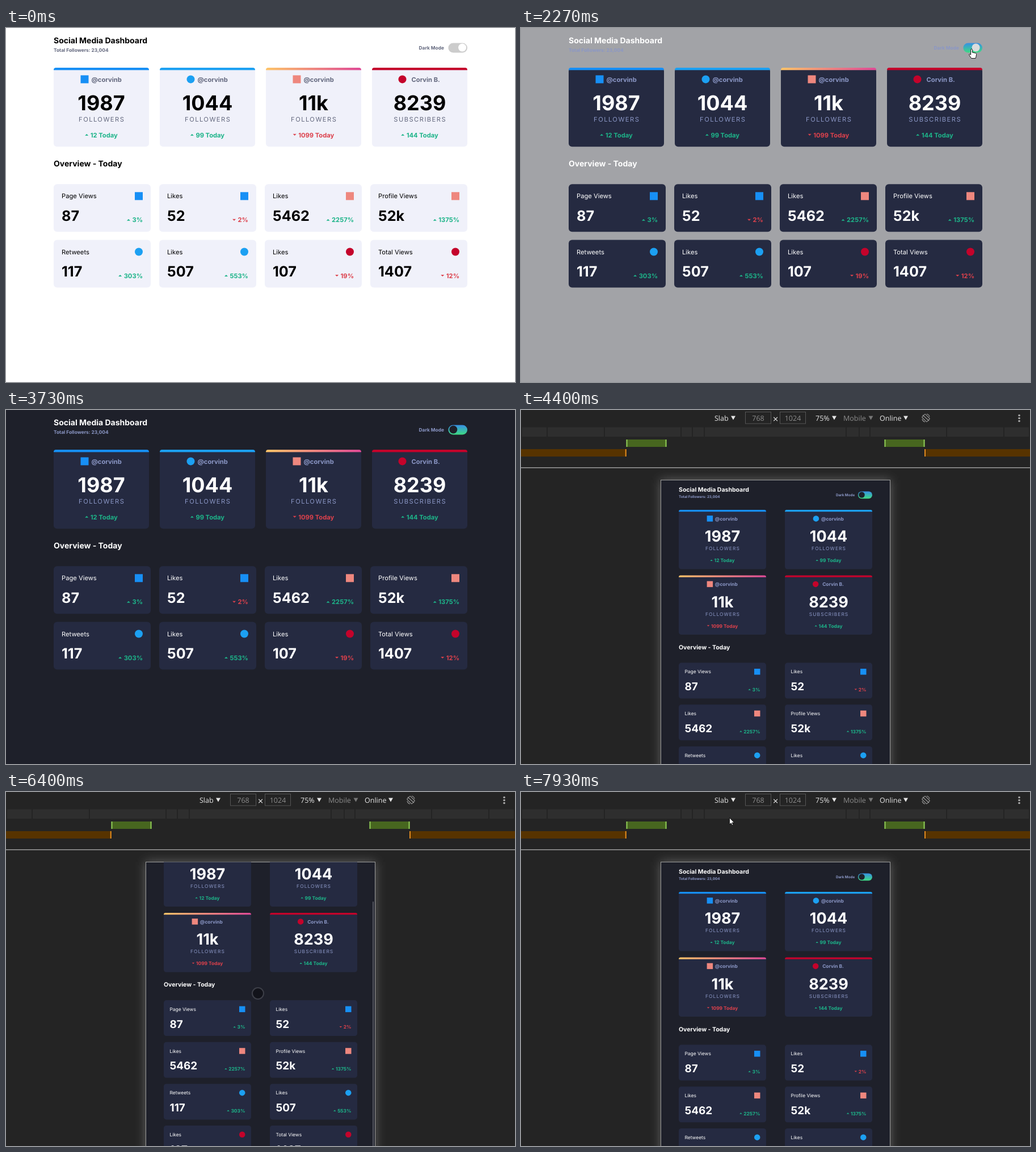
These frames come from a looping animation (897x624 px, 8000 ms). An HTML page:

```html
<!DOCTYPE html>
<html lang="en">
<head>
<meta charset="utf-8">
<title>Social Media Dashboard</title>
<style>
  html, body { margin: 0; width: 100%; height: 100%; overflow: hidden; background: #fff; }
  svg { display: block; font: 400 11.2px Inter, sans-serif; font-optical-sizing: none; text-rendering: geometricPrecision; }
  .light { --ink: #000; --mute: #63687e; --card: #f0f1fa; --pill: #ccc; }
  .dark { --ink: #fff; --mute: #8b97c6; --card: #252a41; --pill: url(#pill); }
  .ink { fill: var(--ink); }
  .mute { fill: var(--mute); }
  .card { fill: var(--card); }
  .pill { fill: var(--pill); }
  .bold { font-weight: 700; }
  .title { font-size: 14px; font-weight: 700; }
  .small { font-size: 8.4px; font-weight: 700; }
  .huge { font-size: 36px; font-weight: 700; text-anchor: middle; }
  .big { font-size: 25.2px; font-weight: 700; }
  .caps { letter-spacing: 1.45px; text-anchor: middle; }
  .end { text-anchor: end; }
  .up { fill: #1db489; font-weight: 700; }
  .down { fill: #dc414c; font-weight: 700; }
  .tools { font: 12.5px "Open Sans", sans-serif; fill: #e6e6e6; }
  .tools .dim { fill: #8c8c8c; }
  .tools .times { font-size: 17px; }
  .mid { text-anchor: middle; }
</style>
</head>
<body>
<svg id="stage" width="897" height="624" viewBox="0 0 897 624">
  <defs>
    <linearGradient id="pill" x2="0" y2="1"><stop stop-color="#378fe6"/><stop offset="1" stop-color="#3eda82"/></linearGradient>
    <linearGradient id="sunset"><stop stop-color="#fdc468"/><stop offset="1" stop-color="#df4996"/></linearGradient>
    <clipPath id="screen"><rect x="247" y="123.5" width="403.5" height="540"/></clipPath>
    <filter id="glow" x="-20%" y="-20%" width="140%" height="140%"><feGaussianBlur stdDeviation="9"/></filter>
  </defs>
  <g id="desktop">
    <rect id="backdrop" width="897" height="624"/>
    <g id="desktopPage"></g>
  </g>
  <g id="devtools">
    <rect width="897" height="624" fill="#242424"/>
    <g id="toolbar" class="tools"></g>
    <rect x="246" y="123" width="405" height="541" fill="#626262" filter="url(#glow)"/>
    <rect x="246.5" y="123.5" width="404" height="541" fill="#1e202a" stroke="#9b9b9b"/>
    <g clip-path="url(#screen)">
      <g id="tabletPage" class="dark"></g>
      <rect id="thumb" x="646" width="2" height="470" rx="1" fill="#54565f"/>
    </g>
  </g>
  <path id="arrow" d="M0 0V11.6l2.7-2.4 1.8 3.8 1.8-.8-1.8-3.7H8.2Z" fill="#fff" stroke="#000" stroke-width=".8"/>
  <path id="hand" d="M-1.4 1.3C-1.4-.4 1.3-.4 1.3 1.3V6l5.4 1.2c1.4.3 2 1 1.9 2.4l-.7 4.2-.9 2.7H-.3L-4 11c-1-1.6.6-2.7 1.8-1.6l.8.9Z" fill="#fff" stroke="#000" stroke-width=".9"/>
  <circle id="touch" r="10" fill="#12131a" stroke="#3d3f48" stroke-width="2"/>
</svg>
<script>
const $ = id => document.getElementById(id);
const pen = document.createElement('canvas').getContext('2d');
pen.font = '700 11.2px Inter, sans-serif';

const networks = {
  blue: { fill: '#178ff5', round: 0 },
  sky: { fill: '#1ca0f2', round: 7 },
  pink: { fill: '#ee877e', bar: 'url(#sunset)', round: 0 },
  red: { fill: '#c4032b', round: 7 },
};
const accounts = [
  ['blue', '@corvinb', '1987', 'FOLLOWERS', 12],
  ['sky', '@corvinb', '1044', 'FOLLOWERS', 99],
  ['pink', '@corvinb', '11k', 'FOLLOWERS', -1099],
  ['red', 'Corvin B.', '8239', 'SUBSCRIBERS', 144],
];
const stats = [
  ['blue', 'Page Views', '87', 3], ['blue', 'Likes', '52', -2],
  ['pink', 'Likes', '5462', 2257], ['pink', 'Profile Views', '52k', 1375],
  ['sky', 'Retweets', '117', 303], ['sky', 'Likes', '507', 553],
  ['red', 'Likes', '107', -19], ['red', 'Total Views', '1407', -12],
];

const text = (x, y, cls, str) => `<text x="${x}" y="${y}" class="${cls}">${str}</text>`;
const box = (x, y, w, h, fill, extra = '') =>
  `<rect x="${x}" y="${y}" width="${w}" height="${h}" fill="${fill}" ${extra}/>`;
const panel = (w, h) => `<rect width="${w}" height="${h}" rx="6" class="card"/>`;
const icon = (x, y, net) => box(x, y, 14, 14, networks[net].fill, `rx="${networks[net].round}"`);

// Arrow plus figure; align 0.5 centres the pair on x, align 1 ends it at x
function delta(x, y, value, suffix, align) {
  const label = Math.abs(value) + suffix, width = pen.measureText(label).width;
  const left = x - (width + 9.5) * align, cls = value > 0 ? 'up' : 'down';
  const tri = value > 0 ? 'l3-3 3 3z' : 'm0-3l3 3 3-3z';
  return `<path d="M${left} ${y - 2.8}${tri}" class="${cls}"/>` + text(left + 9.5, y, cls, label);
}

function accountCard([net, name, count, unit, change], w) {
  const c = w / 2, { fill, bar = fill } = networks[net], gap = net === 'red' ? 3 : 0;
  return panel(w, 139.3) +
    `<path d="M0 4.3V4a4 4 0 0 1 4-4H${w - 4}a4 4 0 0 1 4 4v.3z" fill="${bar}"/>` +
    icon(c - 36.5 - gap / 3, 13.4, net) + text(c - 17.5 + gap, 24.6, 'mute bold', name) +
    text(c, 75, 'ink huge', count) + text(c + .7, 94.6, 'mute caps', unit) +
    delta(c, 122.6, change, ' Today', .5);
}

function statCard([net, label, count, change], w) {
  return panel(w, 84) + text(14, 25.2, 'ink', label) + icon(w - 28, 14, net) +
    text(14, 64.7, 'ink big', count) + delta(w - 14, 67.2, change, '%', 1);
}

function grid(items, draw, cols, left, right, top, w, rowHeight) {
  const pitch = (right - left - w) / (cols - 1);
  return items.map((item, i) => {
    const x = left + i % cols * pitch, y = top + Math.floor(i / cols) * rowHeight;
    return `<g transform="translate(${x} ${y})">${draw(item, w)}</g>`;
  }).join('');
}

function page(cols, left, right, accountWidth, statWidth) {
  const shift = (4 / cols - 1) * 154;
  return text(left, 27.2, 'ink title', 'Social Media Dashboard') +
    text(left, 42, 'mute small', 'Total Followers: 23,004') +
    text(right - 41, 37.8, 'mute small end', 'Dark Mode') +
    `<rect x="${right - 33.6}" y="26.4" width="33.6" height="17" rx="8.5" class="pill"/>` +
    `<circle class="knob" cx="${right - 24.7}" cy="34.5" r="7" fill="#1e202a"/>` +
    grid(accounts, accountCard, cols, left, right, 70, accountWidth, 154) +
    text(left, 243.7 + shift, 'ink title', 'Overview - Today') +
    grid(stats, statCard, cols, left, right, 275.3 + shift, statWidth, 98.2);
}

function toolbar() {
  const drop = (x, fill = '#e6e6e6') => `<path d="M${x} 10.5h8l-4 7z" fill="${fill}"/>`;
  const field = (x, str) => box(x, 3.5, 45, 20.5, 'none', 'stroke="#555"') +
    text(x + 22.5, 19, 'dim mid', str);
  const cuts = [1, 46, 147, 282, 302, 323, 573, 596, 615, 750, 851, 896];
  const ruler = cuts.slice(1).map((cut, i) => box(cuts[i] + 1, 30.5, cut - cuts[i] - 2, 16.5, '#2e2e2e'));
  const green = x => box(x, 52, 71, 13, '#47661f') +
    [x, x + 69].map(edge => box(edge, 52, 2, 13, '#8fca58')).join('');
  const orange = (x, edge) => box(x, 69, 186, 13, '#573300') + box(edge, 69, 2, 13, '#e08a20');
  return text(341, 19, '', 'Slab') + drop(370) + field(395.5, 768) + text(448.5, 22, 'mid times', '×') +
    field(456.5, 1024) + text(519, 19, '', '75%') + drop(548) + text(568, 19, 'dim', 'Mobile') +
    drop(612.5, '#777') + text(632, 19, '', 'Online') + drop(674) +
    `<g fill="none" stroke="#949494" stroke-width="1.2"><rect x="709.5" y="8" width="8" height="12" rx="1"
      transform="rotate(-45 713.5 14)"/><path d="M708 9l11 10M707 16a7 7 0 0 0 5 5M715 7a7 7 0 0 1 5 5"/></g>` +
    [9.5, 14.5, 19.5].map(y => `<circle cx="878" cy="${y}" r="1.8" fill="#aaa"/>`).join('') +
    ruler.join('') + green(185.5) + green(640.5) + orange(0, 183.7) + orange(711, 711) +
    box(0, 101, 897, 1.4, '#a3a3a3');
}

$('desktopPage').innerHTML = page(4, 84, 813, 168, 171);
$('tabletPage').innerHTML = page(2, 42, 496.7, 205.3, 205.3);
$('toolbar').innerHTML = toolbar();
const knob = $('desktopPage').querySelector('.knob');

// Pointer path: time, x, y
const path = [
  [130, 400, 424], [200, 233, 327], [270, 258, 354], [690, 258, 354], [1530, 692, 92],
  [2070, 794, 37], [3110, 794, 37], [3370, 840, -30], [4660, 81, 573], [5400, 472, 403],
  [5480, 472, 403], [5730, 441, 455], [6020, 441, 455], [6400, 444, 355], [6750, 446, 330],
  [6960, 446, 330], [7330, 446, 432], [7420, 446, 432], [7800, 391, 80], [7930, 367.5, 45.5], [8000, 367.5, 45.5],
];
const LOOP = 8000, DARK_AT = 2270, TOOLS_AT = 4200, MAX_SCROLL = 78.5, SLOP = 14;
const clamp = (v, lo = 0, hi = 1) => Math.min(hi, Math.max(lo, v));
const smooth = u => u * u * (3 - 2 * u);
const mix = (a, b, u) => a + (b - a) * u;
const shade = u => `rgb(${[30, 32, 42].map(c => Math.round(mix(255, c, u)))})`;
const show = (el, on) => el.style.display = on ? '' : 'none';

function pointerAt(t) {
  const next = path.findIndex(key => key[0] > t);
  if (next < 1) return [path[0][1], path[0][2]];
  const [t0, x0, y0] = path[next - 1], [t1, x1, y1] = path[next];
  const u = smooth((t - t0) / (t1 - t0));
  return [mix(x0, x1, u), mix(y0, y1, u)];
}

function scrollAt(t, y) {
  if (t < 6020 || t >= 7420) return 0;
  const drag = t < 6960 ? 455 - y - SLOP : MAX_SCROLL - Math.max(0, y - 330 - SLOP);
  return clamp(drag, 0, MAX_SCROLL);
}

function drawTheme(t) {
  const dark = t >= DARK_AT, u = dark ? clamp((t - DARK_AT + 100) / 400) : 0;
  $('desktopPage').setAttribute('class', dark ? 'dark' : 'light');
  $('backdrop').setAttribute('fill', shade(1 - (1 - u ** 1.2) ** 2.5));
  knob.setAttribute('cx', mix(804.1, 788.3, smooth(u)));
  knob.setAttribute('fill', shade(smooth(u)));
}

function drawPointer(t, x, y) {
  const shown = t >= 130 && t < 3370 || t >= 4660;
  const inTablet = t >= TOOLS_AT && x > 246 && x < 651 && y > 123;
  const onToggle = t < TOOLS_AT && x > 779 && y < 44;
  const active = inTablet ? 'touch' : onToggle ? 'hand' : 'arrow';
  for (const id of ['arrow', 'hand', 'touch']) show($(id), shown && id === active);
  $(active).setAttribute('transform', `translate(${x} ${y})`);
}

function draw(now) {
  const t = now % LOOP, [x, y] = pointerAt(t), scroll = scrollAt(t, y);
  show($('desktop'), t < TOOLS_AT);
  show($('devtools'), t >= TOOLS_AT);
  drawTheme(t);
  $('tabletPage').setAttribute('transform', `translate(246.5 ${123.6 - scroll}) scale(.75)`);
  $('thumb').setAttribute('y', 124 + scroll * .88);
  $('thumb').setAttribute('opacity', clamp((t - 6050) / 60) * clamp((7750 - t) / 200));
  drawPointer(t, x, y);
  requestAnimationFrame(draw);
}
draw(performance.now());
</script>
</body>
</html>
```
